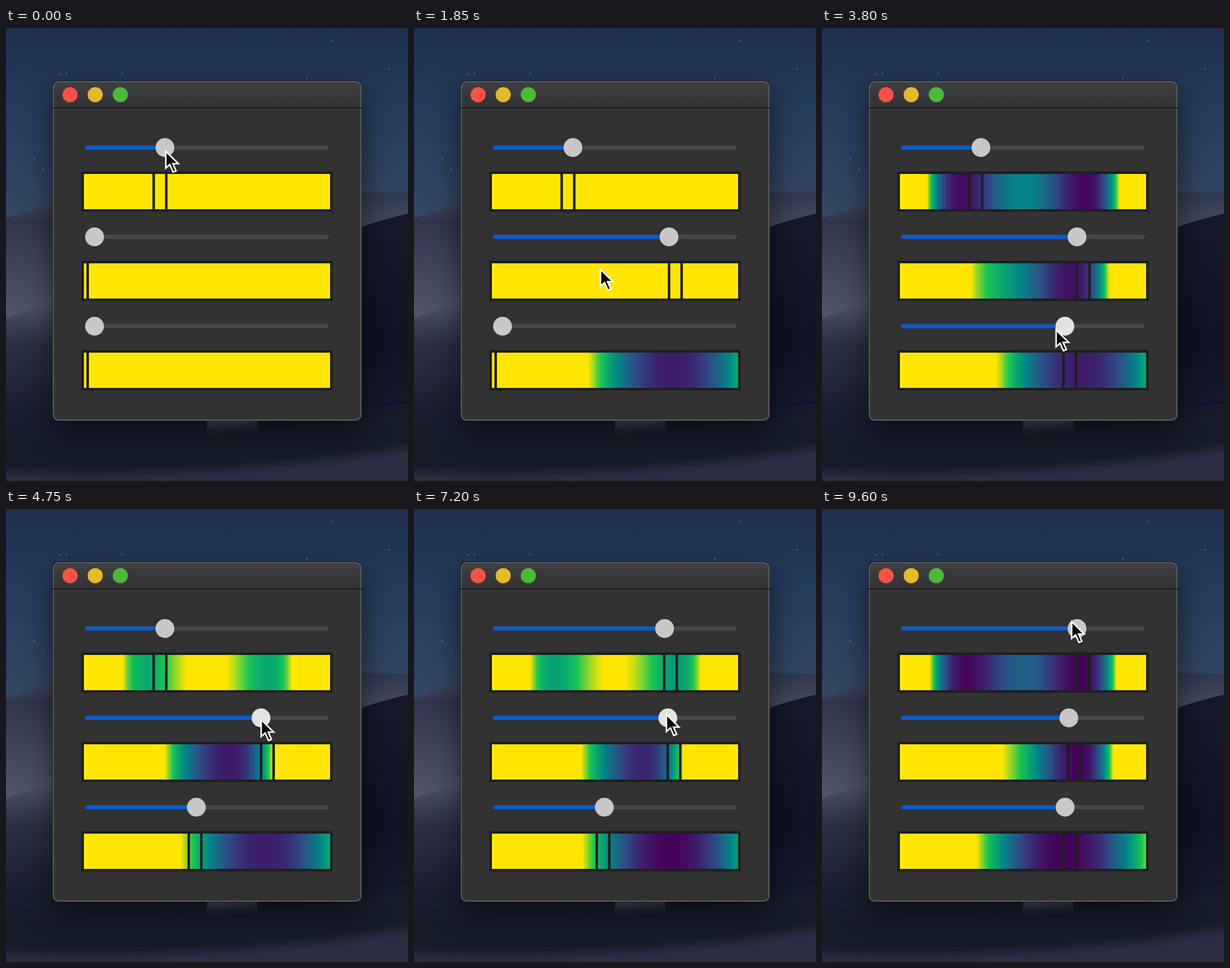
An HTML page for the animation above (9650 ms loop, 640 by 720 pixels).

```html
<!DOCTYPE html>
<html lang="en">
<head>
<meta charset="utf-8">
<title>Sliders</title>
<style>
html, body { margin: 0; width: 100%; height: 100%; overflow: hidden; background: #141829; }
svg { display: block; width: 640px; height: 720px; }
</style>
</head>
<body>
<svg viewBox="0 0 640 720" xmlns="http://www.w3.org/2000/svg">
  <defs>
    <linearGradient id="sky" x1="0" y1="0" x2="0" y2="310" gradientUnits="userSpaceOnUse">
      <stop offset="0" stop-color="#1e304c"/><stop offset=".35" stop-color="#233a5a"/>
      <stop offset="1" stop-color="#344863"/>
    </linearGradient>
    <linearGradient id="leftDune" x1="0" y1="270" x2="0" y2="460" gradientUnits="userSpaceOnUse">
      <stop offset="0" stop-color="#414861"/><stop offset=".2" stop-color="#31364c"/>
      <stop offset="1" stop-color="#50556a"/>
    </linearGradient>
    <linearGradient id="lowDune" x1="0" y1="432" x2="0" y2="720" gradientUnits="userSpaceOnUse">
      <stop offset="0" stop-color="#50556a"/><stop offset=".25" stop-color="#2a2f42"/>
      <stop offset=".6" stop-color="#1a1f31"/><stop offset="1" stop-color="#1c2134"/>
    </linearGradient>
    <linearGradient id="rightDune" x1="0" y1="260" x2="0" y2="315" gradientUnits="userSpaceOnUse">
      <stop offset="0" stop-color="#2e374d"/><stop offset="1" stop-color="#454b62"/>
    </linearGradient>
    <linearGradient id="rightDark" x1="0" y1="285" x2="0" y2="720" gradientUnits="userSpaceOnUse">
      <stop offset="0" stop-color="#151a2c"/><stop offset=".5" stop-color="#0f1224"/>
      <stop offset="1" stop-color="#1b2036"/>
    </linearGradient>
    <linearGradient id="title" x1="0" y1="0" x2="0" y2="1">
      <stop offset="0" stop-color="#3f3f41"/><stop offset="1" stop-color="#333335"/>
    </linearGradient>
    <filter id="soft" x="-30%" y="-30%" width="160%" height="160%"><feGaussianBlur stdDeviation="24"/></filter>
    <filter id="haze" x="-10%" y="-40%" width="120%" height="180%"><feGaussianBlur stdDeviation="8"/></filter>
    <clipPath id="bar"><rect x="120" width="400" height="64"/></clipPath>
  </defs>

  <rect width="640" height="720" fill="url(#sky)"/>
  <path d="M185 72h0M96 72h0M86 73h0M479 80h0M518 20h0M610 65h0M45 209h0M59 224h0"
    stroke="#a3b1c4" stroke-width="1.7" stroke-linecap="round"/>
  <path d="M0 302Q40 290 75 272L320 220L566 261L640 262V720H0Z" fill="url(#leftDune)"/>
  <path d="M400 240L566 261L640 262V340H400Z" fill="url(#rightDune)"/>
  <path d="M400 345L566 316Q604 303 640 295V720H400Z" fill="url(#rightDark)"/>
  <path d="M0 460Q40 447 75 432L320 360V720H0Z" fill="url(#lowDune)"/>
  <path d="M-20 630Q300 655 660 600V760H-20Z" fill="#151a2c" filter="url(#haze)"/>
  <path d="M-20 706Q330 722 660 664V780H-20Z" fill="#2a2e42" filter="url(#haze)"/>

  <rect x="75" y="104" width="491" height="540" rx="12" opacity=".55" filter="url(#soft)"/>
  <rect x="73.5" y="83.5" width="493" height="541" rx="10" fill="#10121a"/>
  <rect x="75" y="85" width="491" height="538" rx="9" fill="#323232"/>
  <path d="M75 127V94a9 9 0 0 1 9-9H557a9 9 0 0 1 9 9V127Z" fill="url(#title)"/>
  <rect x="75" y="128" width="491" height="1.5" fill="#3f3f40"/>
  <rect x="75.25" y="85.25" width="490" height="538" rx="8.5" fill="none" stroke="#68696d" stroke-width="1.5"/>
  <rect x="74" y="126.5" width="493" height="1.6" fill="#141416"/>
  <circle cx="102" cy="106" r="12" fill="#fb5149"/>
  <circle cx="142" cy="106" r="12" fill="#e5bb2b"/>
  <circle cx="182" cy="106" r="12" fill="#4abb36"/>
  <g id="rows"></g>
  <path id="cursor" d="M1.4 3V29.6L7.8 24L13 36L17.7 34L12.6 22.6H21.4Z" fill="#060606" stroke="#fff" stroke-width="2.4"/>
</svg>
<script>
const LOOP = 9650, STEP = 50, CELL = 2, LIMIT = 200, LEAD = 50;
const rowY = i => 190 + 142 * i;
const rowsEl = document.getElementById('rows');
const cursorEl = document.getElementById('cursor');

function add(parent, tag, attrs) {
  const el = document.createElementNS('http://www.w3.org/2000/svg', tag);
  for (const k in attrs) el.setAttribute(k, attrs[k]);
  return parent.appendChild(el);
}

function ease(s) {
  s = Math.min(1, Math.max(0, s));
  return s * s * (3 - 2 * s);
}

// Each drag: slider, start time, pointer offset on the knob, [time, x] goals
const home = [253, 141, 141];
const drags = [
  { s: 1, t: 400, grip: [-8, -12], to: [[1020, 497], [1650, 406]] },
  { s: 2, t: 2240, grip: [-8, 3], to: [[3450, 416], [4500, 303]] },
  { s: 1, t: 4750, grip: [0, 0], to: [[5500, 315]] },
  { s: 0, t: 6100, grip: [0, 0], to: [[6650, 399]] },
  { s: 1, t: 6880, grip: [0, -8], to: [[7100, 408], [7400, 393]] },
  { s: 2, t: 7950, grip: [0, 0], to: [[8700, 387]] },
  { s: 0, t: 9000, grip: [-10, -14], to: [[9450, 406]] }
];
for (const d of drags) d.end = d.to[d.to.length - 1][0];

function knobX(i, t) {
  let x = home[i];
  for (const d of drags.filter(d => d.s === i)) {
    let from = d.t;
    for (const [time, goal] of d.to) {
      x += (goal - x) * ease((t - from) / (time - from));
      from = time;
    }
  }
  return x;
}

// The pointer runs a little ahead of the knob and glides between drags
function pointer(t) {
  const ahead = t + LEAD;
  let x = 253, y = 193, left = LEAD;
  for (const d of drags) {
    const k = ease((ahead - left) / (d.t - left));
    x += (knobX(d.s, Math.min(ahead, d.end)) + d.grip[0] - x) * k;
    y += (rowY(d.s) + d.grip[1] - y) * k;
    left = d.end;
  }
  return [x, y];
}

// Purple, blue, teal, green, yellow
const ramp = [[70, 0, 88], [48, 72, 134], [0, 138, 134], [22, 196, 86], [255, 230, 0]];
function colour(v) {
  const p = 4 * Math.min(1, v / LIMIT), i = Math.min(3, Math.floor(p));
  return `rgb(${ramp[i].map((c, k) => Math.round(c + (ramp[i + 1][k] - c) * (p - i)))})`;
}

// Rosenbrock function of three variables, each in [-2, 2]
const term = (a, b) => 100 * (b - a * a) ** 2 + (1 - a) ** 2;
const cost = ([a, b, c]) => term(a, b) + term(b, c);

const rows = home.map((_, i) => {
  const g = add(rowsEl, 'g', { transform: `translate(0 ${rowY(i)})` });
  const line = { x: 126, y: -3.3, height: 6.6, rx: 3.3 };
  add(g, 'rect', { ...line, width: 388, fill: '#474747' });
  const fill = add(g, 'rect', { ...line, fill: '#0b5ad2' });
  const knob = add(g, 'circle', { r: 15 });
  const box = add(g, 'g', { transform: 'translate(0 38)', 'clip-path': 'url(#bar)' });
  const cells = [];
  for (let x = 124; x < 516; x += CELL)
    cells.push(add(box, 'rect', { x, y: 4, width: CELL, height: 56, 'shape-rendering': 'crispEdges' }));
  const edge = { y: 2, height: 60, fill: 'none', stroke: '#1e1e20', 'stroke-width': 4 };
  const mark = add(box, 'rect', { ...edge, width: 20 });
  add(box, 'rect', { ...edge, x: 122, width: 396 });
  return { fill, knob, cells, mark };
});

function draw(t) {
  const xs = home.map((_, i) => knobX(i, t));
  const us = xs.map(x => (x - 141) / 358);
  rows.forEach((row, i) => {
    const held = drags.some(d => d.s === i && t >= d.t - LEAD && t < d.end + LEAD);
    row.fill.setAttribute('width', xs[i] - 126);
    row.knob.setAttribute('cx', xs[i]);
    row.knob.setAttribute('fill', held ? '#e2e2e2' : '#c8c8c8');
    row.mark.setAttribute('x', 110 + 400 * us[i]);
    const point = us.map(u => 4 * u - 2);
    row.cells.forEach((cell, k) => {
      point[i] = (4 + (k + .5) * CELL) / 100 - 2;
      cell.setAttribute('fill', colour(cost(point)));
    });
  });
  cursorEl.setAttribute('transform', `translate(${pointer(t)})`);
}

let start = null, last = -1;
function tick(now) {
  if (start === null) start = now;
  const t = Math.floor((now - start) % LOOP / STEP) * STEP;
  if (t !== last) draw(last = t);
  requestAnimationFrame(tick);
}
draw(0);
requestAnimationFrame(tick);
</script>
</body>
</html>
```
